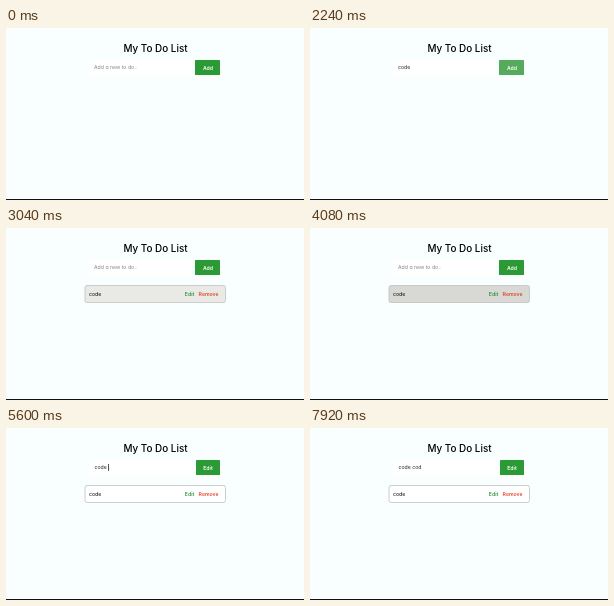
An HTML page for the animation above (8 s loop, 298 px wide and 172 px high).

```html
<!DOCTYPE html>
<html lang="en">
<head>
<meta charset="utf-8">
<title>To do list</title>
<style>
  html, body { margin: 0; height: 100%; overflow: hidden; background: #f9fffe; }
  svg { display: block; width: 298px; height: 172px; }
  text { font: 400 5.2px Inter, sans-serif; font-feature-settings: "cv11"; white-space: pre; }
  .title { font-size: 9.9px; font-weight: 500; text-anchor: middle; }
  .action { font-weight: 500; }
  #label { font-weight: 600; fill: #fff; text-anchor: middle; }
</style>
</head>
<body>
<svg viewBox="0 0 298 172">
  <text class="title" x="149.5" y="24">My To Do List</text>
  <rect x="83" y="32" width="103" height="15" fill="#fff"/>
  <text id="field" y="41.3"></text>
  <rect id="caret" y="36" width=".8" height="7" fill="#222"/>
  <rect id="button" y="32" height="15" rx=".5"/>
  <text id="label" x="202" y="41.6"></text>
  <g id="item">
    <rect id="card" x="79" y="57.5" width="140.5" height="17" rx="2" stroke="#bfc2c0" stroke-width=".8"/>
    <text x="83" y="68">code</text>
    <text class="action" x="178.8" y="68" fill="#1f8a30">Edit</text>
    <text class="action" x="192.6" y="68" fill="#e2341c">Remove</text>
  </g>
  <rect y="171" width="298" height="1" fill="#111"/>
</svg>
<script>
const LOOP = 8000, STEP = 80;
const [field, caret, button, label, item, card] =
  ["field", "caret", "button", "label", "item", "card"].map(id => document.getElementById(id));

const typing = [
  [0, ""], [160, "c"], [320, "co"], [480, "cod"], [640, "code"], [2560, ""],
  [4640, "code"], [5520, "code "], [7600, "code c"], [7760, "code co"], [7920, "code cod"]
];
const caretOn = [[480, 1200], [1760, 2240], [5520, 6080], [6640, 7200]];

const within = (t, [from, to]) => t >= from && t < to;

// CSS "ease": cubic-bezier(.25, .1, .25, 1)
function ease(x) {
  x = Math.min(1, Math.max(0, x));
  const bezier = (u, a, b) => 3 * u * (1 - u) ** 2 * a + 3 * u * u * (1 - u) * b + u ** 3;
  let low = 0, high = 1;
  for (let i = 0; i < 20; i++) {
    const mid = (low + high) / 2;
    if (bezier(mid, .25, .25) < x) low = mid; else high = mid;
  }
  return bezier(low, .1, 1);
}

function draw(now) {
  const t = Math.floor(now % LOOP / STEP) * STEP;
  const editing = t >= 4640;
  const left = editing ? 88.5 : 88;

  const typed = typing.findLast(([start]) => t >= start)[1];
  field.textContent = typed || "Add a new to do..";
  field.setAttribute("x", left);
  field.setAttribute("fill", typed ? "#222" : "#858585");

  caret.style.display = caretOn.some(span => within(t, span)) ? "" : "none";
  caret.setAttribute("x", left + field.getComputedTextLength());

  button.setAttribute("x", editing ? 190 : 189);
  button.setAttribute("width", editing ? 24 : 25);
  button.setAttribute("fill", within(t, [2080, 2800]) ? "#55aa5c" : "#2b9a35");
  label.textContent = editing ? "Edit" : "Add";

  item.style.display = t >= 2560 ? "" : "none";
  const hover = ease((t - 2800) / 720) - ease((t - 4870) / 640);
  card.setAttribute("fill", `rgb(${[39, 39, 43].map(drop => Math.round(255 - drop * hover))})`);
}

const start = performance.now();
function tick() {
  draw(performance.now() - start);
  requestAnimationFrame(tick);
}
tick();
</script>
</body>
</html>
```
